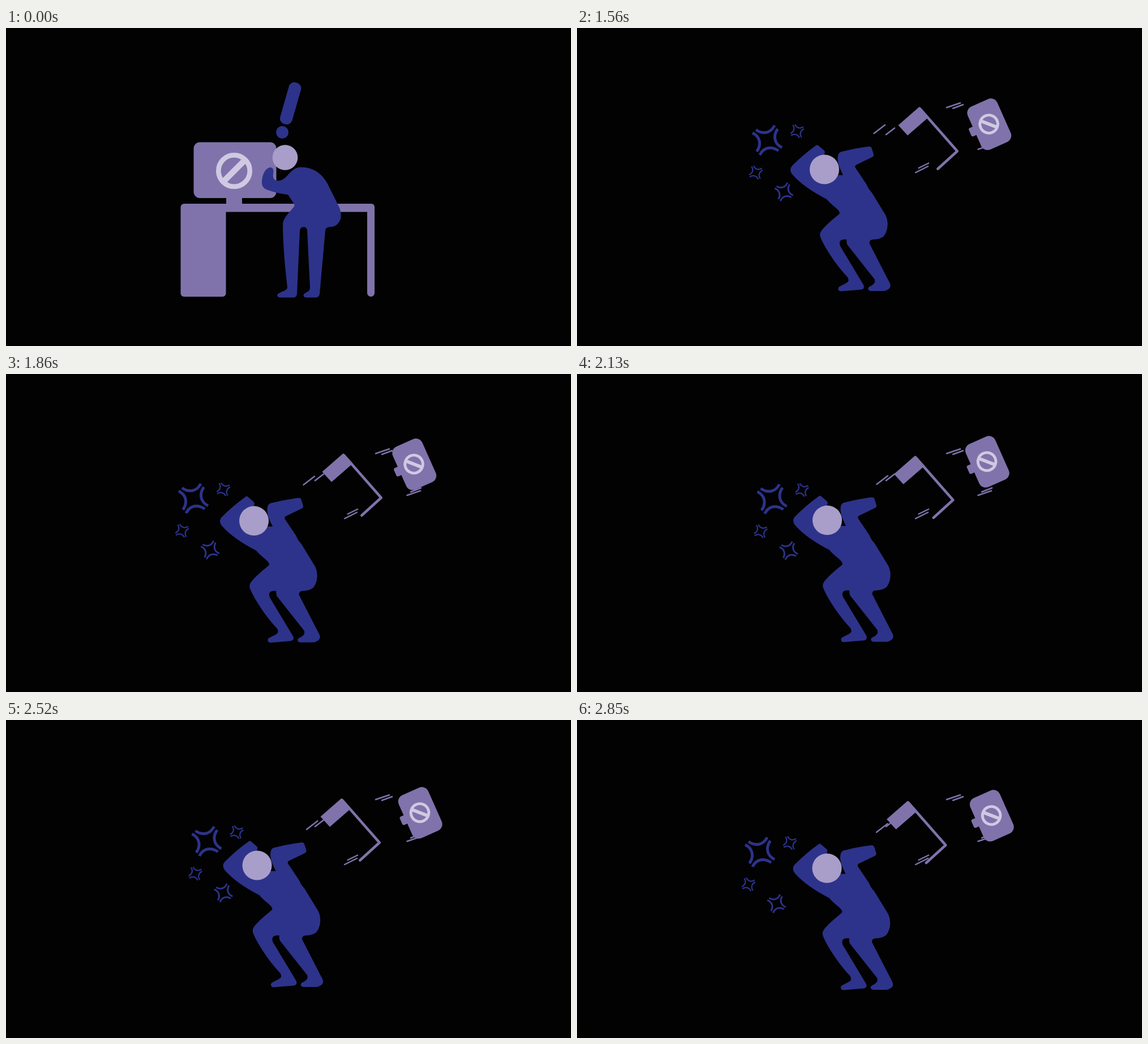
Write an HTML page that moves like this. It is 998 px wide and 561 px high and loops after 2880 ms.

```html
<!DOCTYPE html>
<html lang="en">
<head>
<meta charset="utf-8">
<title>Computer rage</title>
<style>
  html, body { margin: 0; height: 100%; overflow: hidden; background: #020202; }
  svg { display: block; width: 100%; height: 100%; }
  .navy { fill: #2d338a; }
  .lilac { fill: #8073ab; }
  .head { fill: #a89ec9; }
  .speed { fill: none; stroke: #8073ab; stroke-width: 2.5; stroke-linecap: round; stroke-linejoin: round; }
</style>
</head>
<body>
<svg viewBox="0 0 998 561">
  <defs>
    <g id="sign" fill="none" stroke="#cfcae3">
      <circle r="27.7" stroke-width="8.6"/>
      <path d="M-19 19L19 -19" stroke-width="10.5"/>
    </g>
    <path id="arc" d="M-20 -18.5C-8 -10 6 -12 13 -26"/>
    <g id="anger" fill="none" stroke="#2d338a" stroke-width="5">
      <use href="#arc"/>
      <use href="#arc" transform="rotate(90)"/>
      <use href="#arc" transform="rotate(180)"/>
      <use href="#arc" transform="rotate(270)"/>
    </g>
    <g id="alert" class="navy">
      <rect x="-11" y="-91" width="22" height="76" rx="10"/>
      <circle r="11"/>
    </g>
  </defs>

  <g id="stuck">
    <g class="lilac">
      <rect x="331.5" y="201.5" width="146" height="98.5" rx="11"/>
      <rect x="389" y="298" width="28" height="14"/>
      <rect x="308.5" y="310" width="80" height="164" rx="6"/>
      <path d="M380 310H645Q651 310 651 316V467.5A6.5 6.5 0 0 1 638 467.5V324.5H380Z"/>
    </g>
    <use href="#sign" x="403" y="252"/>
    <g class="navy">
      <path d="M452 275C451 262 457 247 467 246Q474 246 472 257C471 264 473 268 479 269.5
        Q490 270 499 258C506 250 512 246 520 245.5C545 245 560 260 568 275L587 313
        C592 322 593 333 590 339Q585 351 572 351H526L505 340L508 316Q511 313 508 309
        L498 294Q480 292 466 287Q453 284 452 275Z"/>
      <path d="M508 316C500 326 490 335 489 345Q489 390 497 458C496 463 489 464 482 468
        C478 470 478 475 484 475.5H508Q513 475.500 514 469L519 357Q520 351 526 351L540 320Z"/>
      <path d="M526 351Q531 351 532 357L537 458C537 464 533 465 528 468C524 470 525 475 530 475.5
        H547Q553 475.500 554 469L564 357Q565 351 572 351L550 330Z"/>
    </g>
    <circle class="head" cx="493" cy="228.500" r="22.300"/>
    <use href="#alert" transform="translate(488 184) rotate(16)"/>
    <use id="alert2" href="#alert" transform="translate(535 197) rotate(33) scale(.83)"/>
    <use id="alert3" href="#alert" transform="translate(567 231) rotate(47) scale(.63)"/>
  </g>

  <g id="rage">
    <path class="speed" d="M546 188l15 -11.500M653 140.300l24 -8M664 141.700l18 -6.500
      M598 255l22 -11M603.500 247l17.500 -8.500M708.500 214l23.500 -8M715 208l18 -7"/>
    <g id="desk">
      <path class="lilac" d="M604.700 139L567.500 171.500L584 189.500L621.500 157Z"/>
      <path class="speed" stroke-linejoin="round" style="stroke-width:4.600" d="M606 142.500L671.700 217.300L637.300 248.500"/>
    </g>
    <g id="monitor">
      <g class="lilac" transform="translate(728.200 169.800) rotate(66)">
        <rect x="-41.500" y="-28.500" width="83" height="57" rx="12.500"/>
        <rect x="-8" y="22" width="16" height="15" rx="3"/>
      </g>
      <use href="#sign" transform="translate(727.500 169.500) rotate(66) scale(.57)"/>
    </g>
    <g id="marks">
      <use href="#anger" transform="translate(336 198)"/>
      <use href="#anger" transform="translate(389 182) rotate(28) scale(.46)"/>
      <use href="#anger" transform="translate(316 255) rotate(28) scale(.46)"/>
      <use href="#anger" transform="translate(365.500 289) rotate(-6) scale(.6)"/>
    </g>
    <g id="person">
      <path class="speed" d="M524.500 186l19.500 -15"/>
      <g class="navy">
        <path d="M426 207L436.500 216Q439 218.500 437 222L436 240L450 259.500H470C466 251 460 240 460.500 229
          Q460.500 221 466 218.500Q490 212 516 209Q519.500 209 520.500 212L524 223Q524.500 226.500 521 228
          L493 241.500Q490 243.500 492 247L511.500 276Q514.500 284 520.500 290L545 330
          C552 344 548 361 541 368Q534 373 524 373H471L464 327Q464 325 462 322
          C457 316 446 309 441 302Q400 281 380 258Q374 250 380 243Q400 223 421 208Q424 205 426 207Z"/>
        <path d="M464 326Q464 328 461 330Q441 346 433 356C429 361 428.500 364 430 369
          C436 384 453 412 475.500 437Q480 441 479.500 446C478 450 471 452 465 455.500
          C460 457 460 464 466 464.500L502 461.500Q509 460 506 453L465 385Q461 374 471 373H500V326Z"/>
        <path d="M476.500 370Q475.500 380 478 383L525.500 443C528 450 523 453 517 456C513 458 513 463 519 464
          H541Q546 464 551 460Q555 457 553 451L516.500 380Q516 373 524 373V370Z"/>
      </g>
      <circle class="head" cx="437" cy="249.500" r="26"/>
    </g>
  </g>
</svg>
<script>
const LOOP = 2880, STEP = 30, RAGE = 1560;
const $ = id => document.getElementById(id);
const show = (id, on) => $(id).style.display = on ? '' : 'none';

// Each part drifts from rest through these [x, y] offsets
const times = [1560, 1860, 2130, 2520, 2850];
const drift = {
  person:  [[0, 0], [1, 9.5], [5, 8.5], [6.5, 7], [4.5, 12]],
  marks:   [[0, 0], [-5, 21.5], [8.5, 22.5], [18.5, 16], [-13, 35]],
  desk:    [[0, 0], [-9, 1], [-7.5, 5], [-12, -1], [-20.5, 3.5]],
  monitor: [[0, 0], [-7, -10.5], [-3.5, -15], [3.5, -6], [4.5, -1]]
};

// Catmull-Rom curve through the points
function glide(points, t) {
  const i = Math.max(0, times.findLastIndex((time, k) => time <= t && k < times.length - 1));
  const u = (t - times[i]) / (times[i + 1] - times[i]);
  const at = k => points[Math.min(Math.max(k, 0), points.length - 1)];
  return [0, 1].map(axis => {
    const [a, b, c, d] = [-1, 0, 1, 2].map(k => at(i + k)[axis]);
    return b + u / 2 * (c - a + u * (2 * a - 5 * b + 4 * c - d + u * (3 * (b - c) + d - a)));
  });
}

function draw(now) {
  const t = Math.floor(now % LOOP / STEP) * STEP;
  show('stuck', t < RAGE);
  show('rage', t >= RAGE);
  show('alert2', t >= 180);
  show('alert3', t >= 330);
  for (const id in drift)
    $(id).setAttribute('transform', `translate(${glide(drift[id], Math.max(t, RAGE))})`);
}

const start = performance.now();
function tick() {
  draw(performance.now() - start);
  requestAnimationFrame(tick);
}
tick();
</script>
</body>
</html>
```
